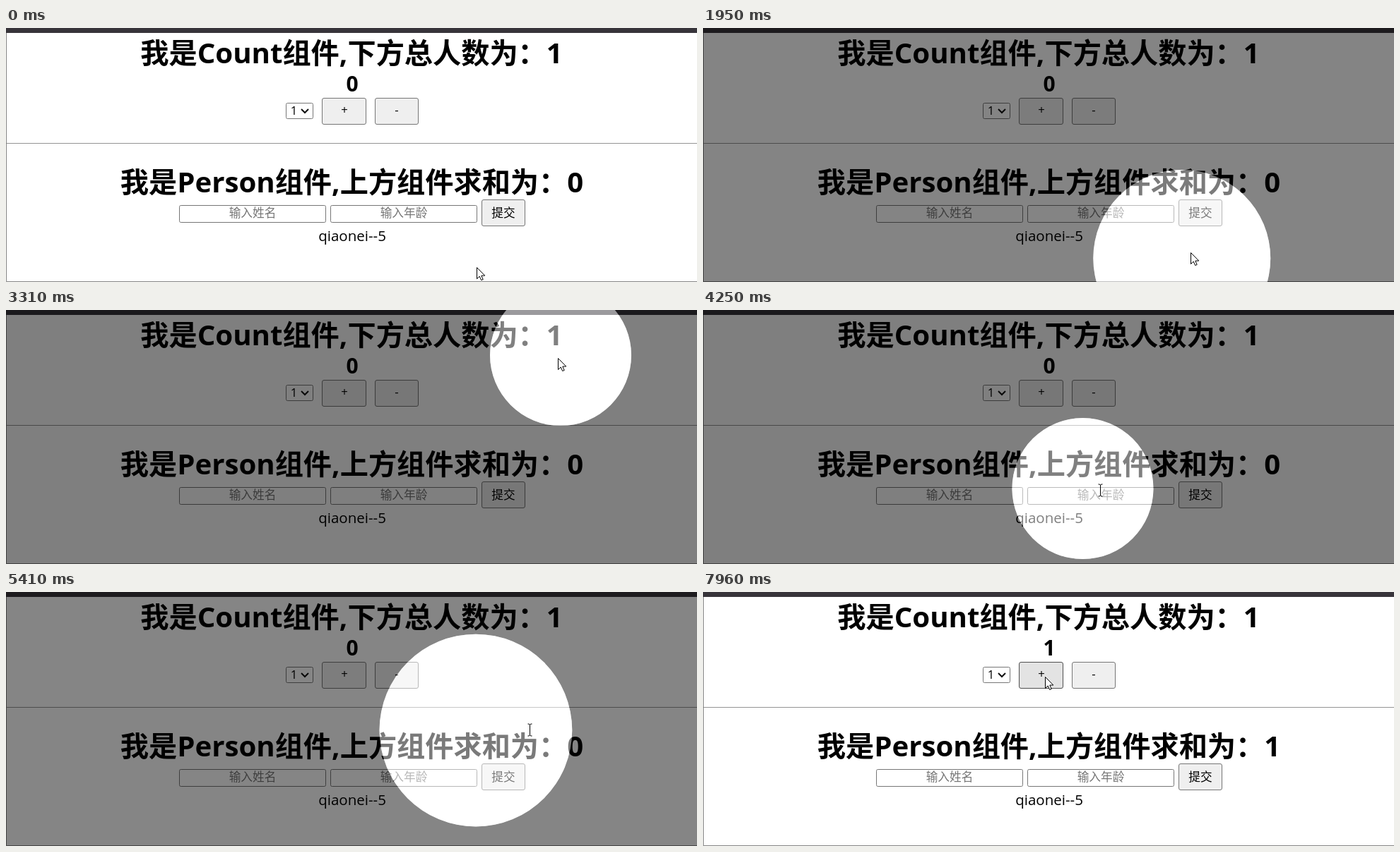
Recreate the animation shown at these times as an HTML page. Size 978 px wide and 360 px high, loop 8 s.

```html
<!DOCTYPE html>
<html lang="zh-CN">
<head>
<meta charset="utf-8">
<title>Count / Person</title>
<style>
  html, body { margin: 0; width: 100%; height: 100%; overflow: hidden; background: #fff; }
  svg { display: block; }
  text {
    font-family: "Open Sans", "Noto Sans CJK SC", "Noto Sans CJK", sans-serif;
    font-size: 16.67px; text-anchor: middle;
  }
  .title { font-size: 40.2px; font-weight: 700; }
  .sum { font-size: 30px; font-weight: 700; }
  .person { font-size: 20.5px; }
  .hint { fill: #757575; }
  .field, .select { fill: #fff; stroke: #767676; }
  .button { fill: #efefef; stroke: #767676; }
  .button.hover { fill: #e3e3e3; stroke: #4f4f4f; }
  .button.active { fill: #f5f5f5; stroke: #8d8d8d; }
</style>
</head>
<body>
<svg width="978" height="360" viewBox="0 0 978 360">
  <rect width="978" height="360" fill="#fff"/>
  <rect width="978" height="7" fill="#37343a"/>
  <path d="M.5 7V359.5H978" fill="none" stroke="#858585"/>
  <path d="M1 163.5H978" stroke="#949494"/>

  <text class="title" x="489" y="50">我是Count组件,下方总人数为：1</text>
  <text class="sum" id="sum" x="490" y="90">0</text>
  <rect class="select" x="396.5" y="106.5" width="38" height="22" rx="2"/>
  <text x="407.5" y="123">1</text>
  <path d="M418 115l5 5 5-5" fill="none" stroke="#111" stroke-width="2"/>
  <rect class="button" x="447.5" y="99.5" width="62" height="37" rx="2.5"/>
  <text x="479" y="122">+</text>
  <rect class="button" x="522.5" y="99.5" width="61" height="37" rx="2.5"/>
  <text x="553" y="122">-</text>

  <text class="title" x="489.5" y="233">我是Person组件,上方组件求和为：<tspan id="total">0</tspan></text>
  <rect class="field" x="245.5" y="251.5" width="207" height="24" rx="2"/>
  <text class="hint" x="349" y="268">输入姓名</text>
  <rect class="field" x="459.5" y="251.5" width="207" height="24" rx="2"/>
  <text class="hint" x="563" y="268">输入年龄</text>
  <rect class="button" x="673.5" y="243.5" width="61" height="37" rx="2.5"/>
  <text x="704" y="268">提交</text>
  <text class="person" x="490" y="302">qiaonei--5</text>

  <path id="shade" fill="#000" fill-rule="evenodd"/>
  <circle id="light" fill="#fff"/>

  <path id="arrow" d="M.5.5V16.5L4.2 13 6.7 18.5 9.2 17.4 6.8 12H11.8Z" fill="#fff" stroke="#000"/>
  <path id="beam" d="M-3-8.5H-1.5L0-7.5 1.5-8.5H3M0-7.5V7.5M-3 8.5H-1.5L0 7.5 1.5 8.5H3" fill="none" stroke="#000"/>
</svg>
<script>
const LOOP = 8000;
const OPEN = 1590, CLOSE = 5394, FADE = 500;
const RADIUS = 100, ZOOM = 9, LAG = 80;
const PRESS = 6950, RELEASE = 7060;

// Turning points of the pointer's wander: time, x, y
const route = [
  [1800, 674, 329], [2420, 811, 234], [2500, 822, 227], [2650, 829, 180],
  [3000, 748, 45], [3230, 785, 64], [3310, 781, 68], [3960, 348, 222],
  [4170, 537, 253], [4250, 562, 255], [4720, 861, 90], [5220, 570, 160],
  [5330, 664, 196], [5410, 740, 195], [5500, 785, 192], [6460, 484, 120]
];

const $ = id => document.getElementById(id);
const all = selector => [...document.querySelectorAll(selector)];
const clamp = u => Math.min(1, Math.max(0, u));
const ramp = (t, from, to) => clamp((t - from) / (to - from));
const smooth = u => u * u * (3 - 2 * u);

const buttons = all('.button');
const buttonBoxes = buttons.map(el => el.getBBox());
const textBoxes = all('.title, .sum, .person, .field').map(el => el.getBBox());
const within = (x, y, box, pad = 0) =>
  x >= box.x - pad && x < box.x + box.width + pad && y >= box.y && y < box.y + box.height;

// Slope at a route point; zero at the ends and at turns
function slope(i, k) {
  const a = route[i - 1], p = route[i], b = route[i + 1];
  if (!a || !b) return 0;
  const before = (p[k] - a[k]) / (p[0] - a[0]);
  const after = (b[k] - p[k]) / (b[0] - p[0]);
  return before * after <= 0 ? 0 : 2 * before * after / (before + after);
}

function wander(t) {
  let i = 0;
  while (i < route.length - 2 && t >= route[i + 1][0]) i++;
  const a = route[i], b = route[i + 1], d = b[0] - a[0];
  const u = clamp((t - a[0]) / d), v = 1 - u, s = smooth(u);
  return [1, 2].map(k =>
    a[k] + (b[k] - a[k]) * s + d * u * v * (v * slope(i, k) - u * slope(i + 1, k)));
}

// The wander, with a nudge before it and a dip below the button after it
function pointerAt(t) {
  const [x, y] = wander(t);
  const nudge = 1 - ramp(t, 250, 290);
  const dip = smooth(ramp(t, 7090, 7310)) - smooth(ramp(t, 7880, 7960));
  return [x - 8 * nudge + 3 * dip, y + 10 * nudge + 18 * dip];
}

// cubic-bezier(.41, .52, 0, .94)
function ease(x) {
  if (x <= 0 || x >= 1) return clamp(x);
  const curve = (s, p, q) => 3 * (1 - s) * (1 - s) * s * p + 3 * (1 - s) * s * s * q + s * s * s;
  let lo = 0, hi = 1;
  for (let n = 0; n < 24; n++) {
    const mid = (lo + hi) / 2;
    if (curve(mid, .41, 0) < x) lo = mid; else hi = mid;
  }
  return curve(lo, .52, .94);
}

function drawSpotlight(t) {
  const level = ease((t - OPEN) / FADE) - ease((t - CLOSE) / FADE);
  const [x, y] = pointerAt(t - LAG);
  const r = RADIUS * (ZOOM + (1 - ZOOM) * level);
  const light = $('light'), shade = $('shade');
  light.setAttribute('cx', x);
  light.setAttribute('cy', y);
  light.setAttribute('r', r);
  shade.setAttribute('d',
    `M0 0H978V360H0ZM${x - r} ${y}a${r} ${r} 0 1 0 ${2 * r} 0a${r} ${r} 0 1 0 ${-2 * r} 0Z`);
  // Clip the hole to the stage by drawing a frame wide enough to hold it
  shade.setAttribute('d', shade.getAttribute('d').replace('M0 0H978V360H0Z', 'M-2000-2000H3000V3000H-2000Z'));
  light.setAttribute('opacity', level / 2);
  shade.setAttribute('opacity', level / 2);
}

function drawPointer(t) {
  const [x, y] = pointerAt(t).map(Math.round);
  const overText = textBoxes.some(box => within(x, y, box, 8));
  $('arrow').style.display = overText ? 'none' : '';
  $('beam').style.display = overText ? '' : 'none';
  $('arrow').setAttribute('transform', `translate(${x} ${y})`);
  $('beam').setAttribute('transform', `translate(${x + .5} ${y + .5})`);
  buttons.forEach((button, i) => {
    const over = within(x, y, buttonBoxes[i]);
    button.classList.toggle('hover', over);
    button.classList.toggle('active', over && t >= PRESS && t < RELEASE);
  });
}

function draw(t) {
  $('sum').textContent = $('total').textContent = t >= RELEASE ? '1' : '0';
  drawSpotlight(t);
  drawPointer(t);
}

const start = performance.now();
function tick() {
  draw((performance.now() - start) % LOOP);
  requestAnimationFrame(tick);
}
tick();
</script>
</body>
</html>
```
